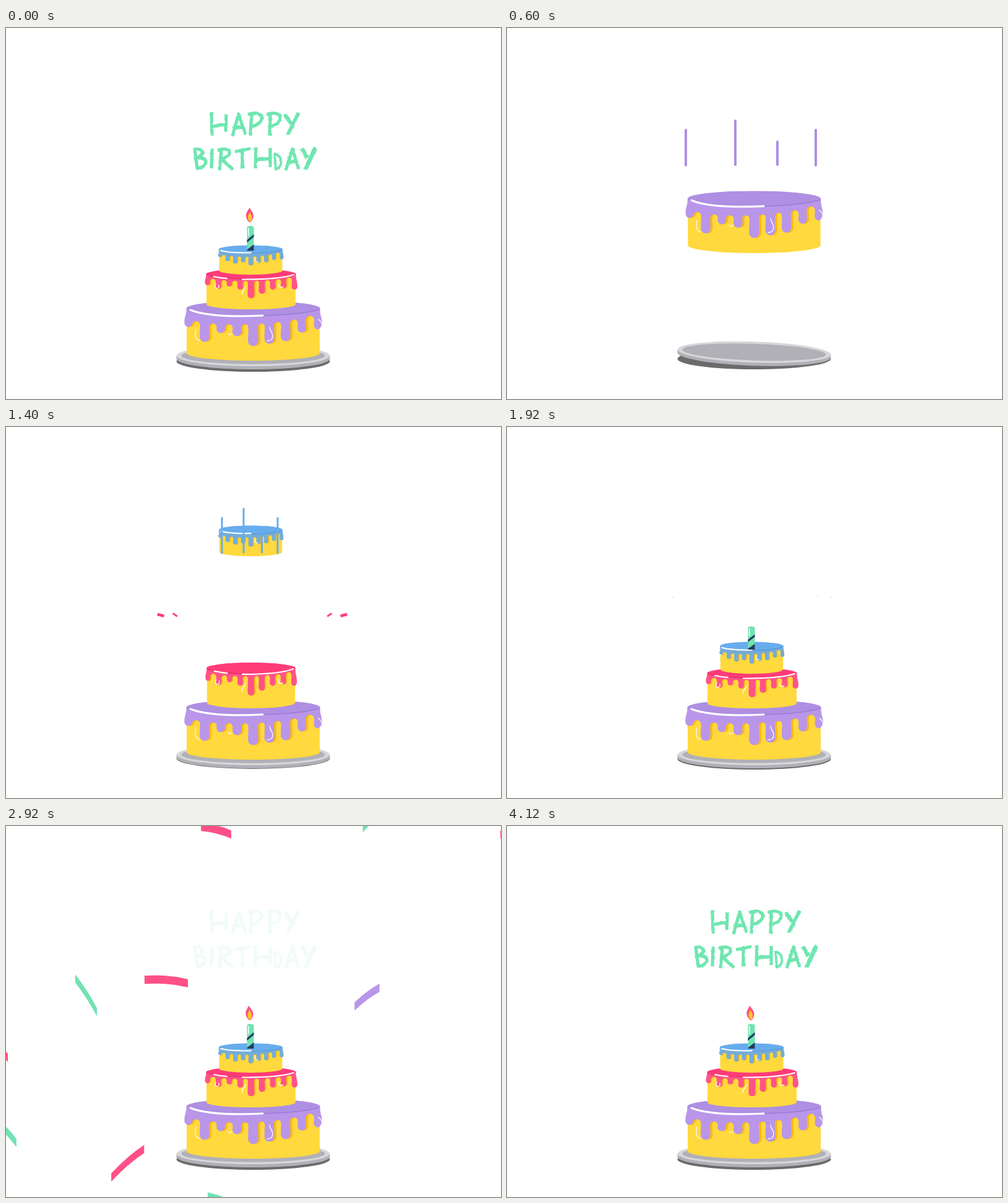
Recreate the animation shown at these times as an HTML page. Size 800x600 px, loop 4160 ms.

```html
<!DOCTYPE html>
<html lang="en">
<head>
<meta charset="utf-8">
<title>Happy Birthday</title>
<style>
  html, body { margin: 0; width: 100%; height: 100%; overflow: hidden; background: #fff; }
  svg { display: block; width: 800px; height: 600px; }
</style>
</head>
<body>
<svg viewBox="0 0 800 600">
  <defs>
    <filter id="rough" x="-10%" y="-10%" width="120%" height="120%">
      <feTurbulence type="fractalNoise" baseFrequency=".16" numOctaves="2" seed="4"/>
      <feDisplacementMap in="SourceGraphic" scale="3" xChannelSelector="R" yChannelSelector="G"/>
    </filter>
  </defs>

  <g id="confetti"></g>

  <ellipse id="shadow" cx="399.5" rx="124" ry="17" fill="#6b6b6b"/>
  <g id="plate">
    <path d="M-124 0v5a124 17 0 0 0 248 0v-5z" fill="#b1b0b6"/>
    <ellipse rx="124" ry="17" fill="#d6d7da"/>
    <ellipse rx="116" ry="13.5" fill="#b1b0b6"/>
  </g>

  <g id="tiers"></g>

  <g id="candle">
    <path d="M389.5 322.5a5.5 2.5 0 0 1 11 0V360h-11z" fill="#70e3b1"/>
    <path d="M389.5 343L400.5 333.5V338L389.5 347zM389.5 358.5L400.5 350V360h-11z" fill="#243b63"/>
    <path d="M392 324v12" stroke="#fff" stroke-width="1.5" stroke-linecap="round"/>
  </g>
  <g id="flame">
    <path d="M0 0C-3-2-6-6-6-11C-6-16-2-20 0-24C2-20 6-16 6-11C6-6 3-2 0 0z" fill="#ff4f85"/>
    <path d="M.5-1C-2-3-3-5-3-8C-3-12-1-14 .5-17C2-14 3.5-12 3.5-8C3.5-5 2-2 .5-1z" fill="#ffc824"/>
  </g>

  <g id="lettering" role="img" aria-label="HAPPY BIRTHDAY" fill="none" stroke="#6fe6b0" stroke-width="5.3"
     stroke-linejoin="round" filter="url(#rough)">
    <path d="M332 136L333 174M333 159L357 156M356 139L355 168"/>
    <path d="M366 175L376 139L387 173M368 162L384 160"/>
    <path d="M397 138L395 174M391 140C407 134 417 141 412 150Q407 158 396 159"/>
    <path d="M427 138L426 174M421 140C437 134 447 141 442 150Q437 158 427 159"/>
    <path d="M450 139L461 155M473 137L455 173" stroke-width="6"/>
    <path d="M305 196L309 227M303 197C318 192 323 204 309 210C329 209 327 226 307 227"/>
    <path d="M333 195L332 227"/>
    <path d="M348 197L345 230M342 198C362 190 370 206 348 212L367 229"/>
    <path d="M370 200L396 195M382 198L382 227"/>
    <path d="M404 193L403 227M404 213L428 211M427 194L427 225"/>
    <path d="M434 202L436 230M434 203C447 208 449 222 436 229" stroke-width="4"/>
    <path d="M452 230L463 196L473 228M456 217L471 215"/>
    <path d="M478 195L487 210M500 193L484 229" stroke-width="7"/>
  </g>
</svg>

<script>
const LOOP = 4160, STEP = 40;
const $ = id => document.getElementById(id);
const set = (el, attrs) => { for (const k in attrs) el.setAttribute(k, attrs[k]); };
const show = (el, on) => set(el, { visibility: on ? 'visible' : 'hidden' });
const ramp = (t, a, b) => Math.min(1, Math.max(0, (t - a) / (b - a)));

function add(parent, tag, attrs) {
  const el = document.createElementNS('http://www.w3.org/2000/svg', tag);
  set(el, attrs);
  parent.append(el);
  return el;
}
const stroke = (parent, d, color, width, cap = 'butt') => add(parent, 'path',
  { d, fill: 'none', stroke: color, 'stroke-width': width, 'stroke-linecap': cap });

let seed = 11;
const random = () => (seed = seed * 16807 % 2147483647) / 2147483647;

// drips: depth of each tip below the centre of the top; lip: icing left above the gaps
const tiers = [
  {
    start: 600, drop: 174, cx: 399.5, cy: 453.5, rx: 108, ry: 12, base: 538, lip: 13,
    top: '#ae8fe2', side: '#b996e9', edge: '#9273d2', shade: 3.5,
    drips: [30, 54, 40, 45, 61, 57, 53, 39, 34],
    rim: 'M415 465Q475 464 507 455',
    gloss: 'M298 456Q330 469 415 465', glossWidth: 3,
    glints: 'M307 487C304 498 307 505 313 505M359 494Q362 499 365 494M426 484C427 491 431 492 431 498Q431 506 422 506M505 471Q515 479 507 487',
    streaks: [289, 369, 437, 499], lift: 0,
    splash: { x: 399, y: 364, size: 1 }
  },
  {
    start: 1000, drop: 201, cx: 396, cy: 398, rx: 72.5, ry: 8, base: 455, lip: 3,
    top: '#ff3b78', side: '#ff5388', edge: '#dc2d67', shade: 2,
    drips: [18, 24, 20, 25, 39, 32, 25, 23, 25],
    rim: 'M324 399Q340 406 396 406',
    gloss: 'M336 402Q345 404 357 405M382 406.5Q440 407 465 399', glossWidth: 2,
    glints: 'M339 414Q336 421 342 421Q345 420 344 416M387 419C385 424 381 426 381 431M440 414Q440 421 448 419',
    streaks: [329, 379, 417, 459], lift: 0,
    splash: { x: 398, y: 303, size: .755 }
  },
  {
    start: 1400, drop: 190, cx: 395.5, cy: 358, rx: 51.5, ry: 6.5, base: 399, lip: 5,
    top: '#67adee', side: '#75acd8', edge: '#5594cf', shade: 1.5,
    drips: [13, 19, 23, 21, 26, 22, 21, 17, 16],
    rim: 'M396 364.5Q430 364 446 359',
    gloss: 'M347 360Q362 364 396 363.5', glossWidth: 2,
    glints: 'M344 363Q340 369 345 371M403 372Q401 379 407 378',
    streaks: [349, 384, 413.5, 439], lift: 18,
    splash: { x: 395.5, y: 275, size: .63 }
  }
];
const streakTop = [165, 150, 184, 165], streakLength = [57, 71, 37, 57];

// Round tips at even spacing, with a round gap midway between neighbours
function icingPath({ cx, cy, rx, ry, lip, drips }) {
  const tips = drips.map((depth, i) => ({
    x: cx + rx * (-.97 + i * .2425), y: cy + depth, r: rx * .043 + depth * .06
  }));
  let x = cx - rx, y = cy, d = `M${x} ${y}`;
  const flank = (x1, y1) => {
    const mid = (y + y1) / 2;
    d += `C${x} ${mid} ${x1} ${mid} ${x1} ${y1}`;
    x = x1;
    y = y1;
  };
  const cap = (r, sweep) => {
    x += 2 * r;
    d += `A${r} ${r} 0 0 ${sweep} ${x} ${y}`;
  };
  tips.forEach((tip, i) => {
    flank(tip.x - tip.r, tip.y - tip.r);
    cap(tip.r, 0);
    const next = tips[i + 1];
    if (!next) return;
    const left = tip.x + tip.r, right = next.x - next.r;
    const mid = (left + right) / 2, r = (right - left) / 2 + rx * .005;
    const u = (mid - cx) / rx;
    const top = cy + ry * Math.sqrt(1 - u * u) + lip * (1 - .4 * u - .33 * u * u);
    flank(mid - r, top + r);
    cap(r, 1);
  });
  flank(cx + rx, cy);
  return d + `A${rx} ${ry} 0 0 0 ${cx - rx} ${cy}z`;
}

function buildTier(tier, i) {
  const { cx, cy, rx, ry, base, top, splash } = tier, root = $('tiers');
  const cake = tier.cake = add(root, 'g', {});
  const w = rx - .5;
  const body = `M${cx - w} ${cy}V${base - ry}A${w} ${ry} 0 0 0 ${cx + w} ${base - ry}V${cy}z`;
  const icing = icingPath(tier);
  add(add(cake, 'clipPath', { id: 'body' + i }), 'path', { d: body });
  add(cake, 'path', { d: body, fill: '#ffd93d' });
  add(add(cake, 'g', { 'clip-path': `url(#body${i})` }), 'path',
    { d: icing, fill: '#fdb813', transform: `translate(${tier.shade})` });
  add(cake, 'path', { d: icing, fill: tier.side });
  add(cake, 'ellipse', { cx, cy, rx, ry, fill: top });
  stroke(cake, tier.rim, tier.edge, 1);
  stroke(cake, tier.gloss, '#fff', tier.glossWidth, 'round');
  stroke(cake, tier.glints, '#fff', 1.3, 'round');

  tier.lines = tier.streaks.map(x => add(root, 'line',
    { x1: x, x2: x, stroke: top, 'stroke-width': i ? 3 : 4, 'stroke-linecap': 'round' }));

  tier.jets = [];
  for (const side of [1, -1]) {
    const g = add(root, 'g',
      { transform: `translate(${splash.x} ${splash.y}) scale(${splash.size * side} ${splash.size})` });
    tier.jets.push(stroke(g, 'M-120 81Q-155 8-203 0', top, 6), stroke(g, 'M-120 76Q-145 11-170-2', top, 4));
  }
  for (const jet of tier.jets) set(jet, { pathLength: 1 });
}
tiers.forEach(buildTier);

const PINK = '#ff5087', GREEN = '#73e2b2', PURPLE = '#b996e9';
const FOCUS = { x: 397, y: 257 };

// A strip of paper, bowed upwards, with upright ends
function strip(color, x, y, dx, dy) {
  const bow = Math.hypot(dx, dy) * .08;
  add($('confetti'), 'path', { fill: color, d: `M${x} ${y}q${dx / 2} ${dy / 2 - bow} ${dx} ${dy}` +
    `v3.3q${-dx / 2} ${-dy / 2 - bow} ${-dx} ${-dy}z` });
}

// Scatter strips on a loose grid, leaving the corners and the middle free
function scatter() {
  for (let row = 0; row < 7; row++) {
    for (let col = 0; col < 11; col++) {
      const x = 112 + 55 * (col + (random() - .5) * .8);
      const y = 68 + 62 * (row + (random() - .5) * .8);
      const angle = (random() - .5) * 2, length = 7 + 12 * random(), pick = random();
      const far = Math.hypot((x - FOCUS.x) / 310, (y - FOCUS.y) / 230);
      const middle = Math.abs(x - FOCUS.x) < 66 && Math.abs(y - FOCUS.y) < 42;
      if (far > 1.15 || middle) continue;
      const color = pick < .42 ? PINK : pick < .83 ? GREEN : PURPLE;
      strip(color, x, y, length * Math.cos(angle), length * Math.sin(angle));
    }
  }
  // The two that pass closest to the viewer
  strip(PINK, 354, 253.3, 17.4, 1.4);
  strip(PURPLE, 438.3, 264, 10, -7.5);
}
scatter();

// Fall, then squash and stretch about the base
function land(el, p, drop, cx, base) {
  const off = -drop * Math.max(0, 90 - p) / 90;
  const sy = p < 90 ? 1.04 : 1 - .165 * Math.sin(2 * Math.PI * ramp(p, 90, 560));
  const sx = 1 - (sy - 1) * .08;
  set(el, { transform: `translate(${cx} ${base + off}) scale(${sx} ${sy}) translate(${-cx} ${-base})` });
}

function drawTier(tier, t) {
  const p = t - tier.start;
  land(tier.cake, p, tier.drop, tier.cx, tier.base);

  const cut = ramp(p, 0, 120);
  tier.lines.forEach((line, i) => {
    const y = streakTop[i] - tier.lift + 1.6 * Math.min(p, 0), length = streakLength[i];
    set(line, { y1: y + length * cut, y2: y + length });
    show(line, p > -160 && cut < 1);
  });

  const head = ramp(p, 90, 240), tail = 1 - (1 - ramp(p, 160, 560)) ** 2.3;
  for (const jet of tier.jets) {
    set(jet, { 'stroke-dasharray': `0 ${tail} ${Math.max(0, head - tail)} 2` });
    show(jet, head > tail);
  }
}

function drawPlate(t) {
  const since = Math.max(0, t - 240), rock = Math.exp(-since / 90) * Math.cos(since / 50);
  const y = 524 + 6 * ramp(t, 600, 1400) + 14 * rock - 600 * (1 - ramp(t, 40, 240));
  const tilt = 2.1 * (1 - ramp(t, 1000, 1400)) - 14 * rock;
  set($('plate'), { transform: `translate(399.5 ${y}) rotate(${tilt})` });
  const size = ramp(t, 120, 280);
  set($('shadow'), { cy: 535 + 4 * ramp(t, 1000, 2800), rx: 124 * size, ry: 17 * size });
}

function draw(t) {
  drawPlate(t);
  for (const tier of tiers) drawTier(tier, t);
  land($('candle'), t - 1800, 190, 395, 360);

  const lean = 2.2 * Math.cos(2 * Math.PI * (t - 80) / 400);
  const grow = ramp(t, 2360, 2640);
  set($('flame'), { opacity: grow,
    transform: `translate(394.2 314.5) skewX(${Math.atan(lean / 24) * 180 / Math.PI}) scale(${grow})` });

  const zoom = (Math.max(0, t - 2240) / 360) ** 2.19;
  set($('confetti'), { transform: `translate(${FOCUS.x} ${FOCUS.y}) scale(${zoom}) translate(${-FOCUS.x} ${-FOCUS.y})` });
  show($('confetti'), zoom > 0 && t < 3500);

  set($('lettering'), { opacity: ramp(t, 2880, 3320) });
}

const begin = performance.now();
function tick() {
  const t = Math.floor((performance.now() - begin) % LOOP / STEP) * STEP;
  draw(t || LOOP); // the loop opens on its finished picture
  requestAnimationFrame(tick);
}
tick();
</script>
</body>
</html>
```
